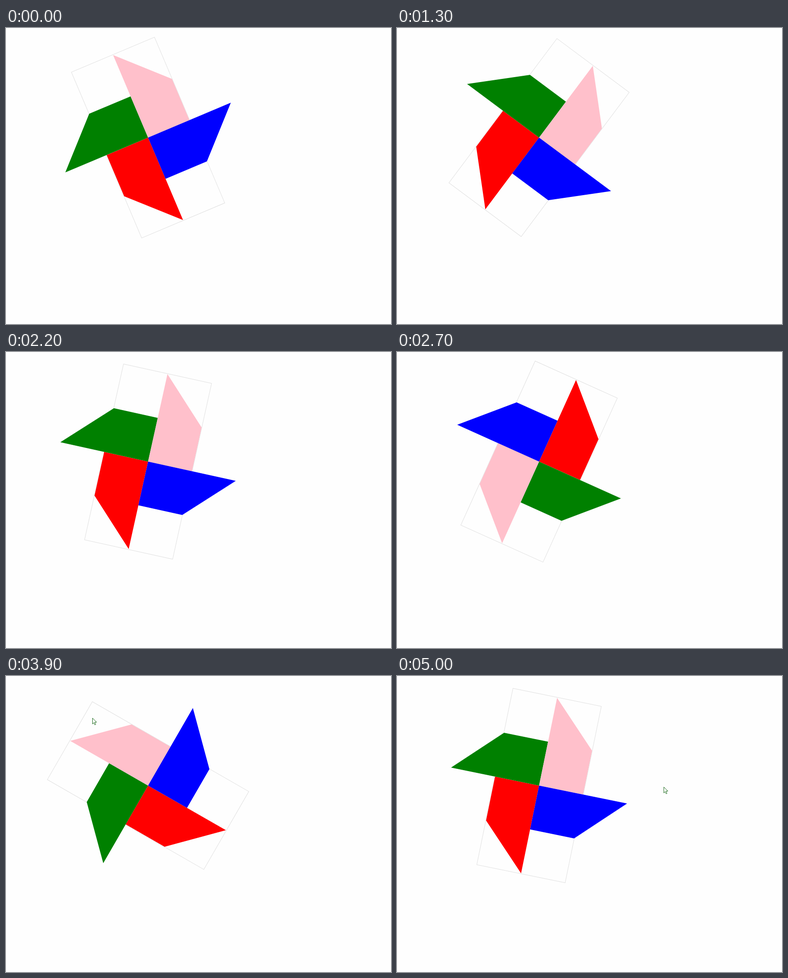
Animation, 852 px wide and 657 px high, one loop 5100 ms. Source, as an HTML page with a canvas:

```html
<!DOCTYPE html>
<html>
<head>
<meta charset="utf-8">
<title>Pinwheel</title>
<style>
  html, body { margin: 0; width: 100%; height: 100%; overflow: hidden; background: #fefefe; }
  canvas { display: block; }
</style>
</head>
<body>
<canvas id="stage" width="852" height="657"></canvas>
<script>
const ctx = document.getElementById('stage').getContext('2d');
const LOOP = 5100, STEP = 100, UNIT = 99.4;
const BLADES = ['red', 'green', 'pink', 'blue'];
const arrow = new Path2D('M0 0V13L3 10L5 15L7 14L5 9H9Z');

// The wheel advances in whole ticks of about 12 degrees, 3 or 4 per step,
// after a jump on the first step.
function wheelAngle(step) {
  const ticks = step ? Math.floor(3.19 * (step - 8) + 0.06) : -19;
  return (24.9 + 11.99 * ticks) * Math.PI / 180;
}

function drawWheel(angle) {
  ctx.save();
  ctx.translate(314.4, 243.2);
  ctx.rotate(angle);
  ctx.strokeStyle = '#e0e0e0';
  ctx.strokeRect(-99.8, -199.8, 199.6, 399.6);
  for (const color of BLADES) {
    ctx.beginPath();
    ctx.lineTo(0, 0);
    ctx.lineTo(0, -2 * UNIT);
    ctx.lineTo(UNIT, -UNIT);
    ctx.lineTo(UNIT, 0);
    ctx.fillStyle = color;
    ctx.fill();
    ctx.rotate(Math.PI / 2);
  }
  ctx.restore();
}

// The pointer leaves to the right, then returns from the left.
function pointerAt(step) {
  const glide = (s0, x0, y0, s1, x1, y1) => {
    const p = (step - s0) / (s1 - s0);
    return [x0 + (x1 - x0) * p, y0 + (y1 - y0) * p];
  };
  if (step >= 17 && step <= 20) return glide(17, 209, 95, 20, 822, 255);
  if (step < 30) return null;
  if (step <= 32) return glide(30, 0, 55, 32, 207, 20);
  if (step <= 39) return glide(32, 207, 20, 39, 191, 93);
  return glide(39, 191, 93, 50, 590, 246);
}

function drawPointer([x, y]) {
  ctx.save();
  ctx.translate(Math.round(x) + 0.5, Math.round(y) + 0.5);
  ctx.fillStyle = '#fff';
  ctx.fill(arrow);
  ctx.strokeStyle = '#1c6a1c';
  ctx.stroke(arrow);
  ctx.restore();
}

function frame() {
  const step = Math.floor((performance.now() - start) % LOOP / STEP);
  ctx.fillStyle = '#fefefe';
  ctx.fillRect(0, 0, 852, 657);
  drawWheel(wheelAngle(step));
  const pointer = pointerAt(step);
  if (pointer) drawPointer(pointer);
  requestAnimationFrame(frame);
}

const start = performance.now();
frame();
</script>
</body>
</html>
```
